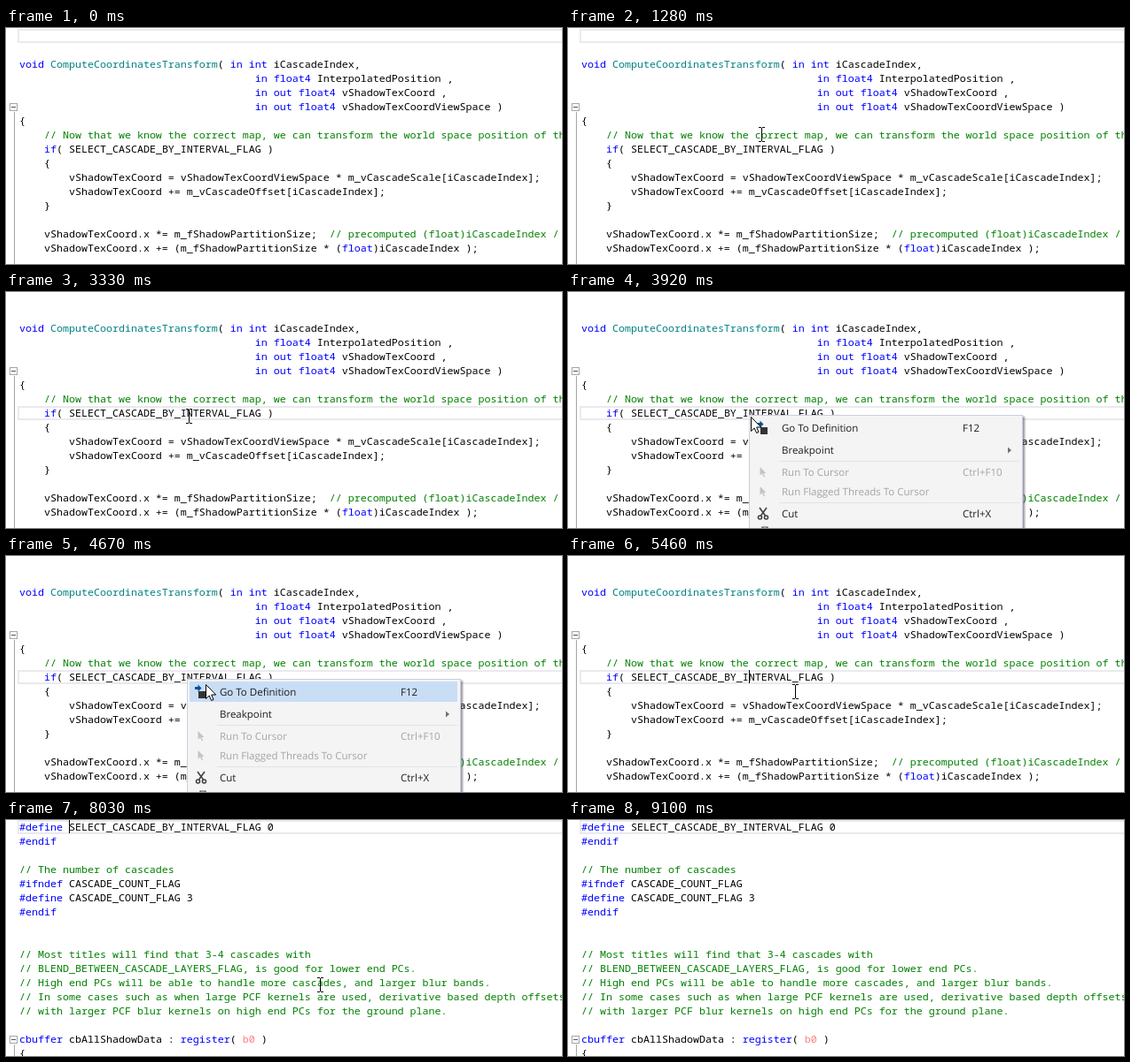
These frames come from a looping animation (627x267 px, 9.37 s). An HTML page:

```html
<!DOCTYPE html>
<html lang="en">
<head>
<meta charset="utf-8">
<title>Go to definition</title>
<style>
  html, body { margin: 0; width: 100%; height: 100%; overflow: hidden; background: #fff; }
  #stage { position: relative; width: 627px; height: 267px; overflow: hidden; contain: strict; }
  pre {
    position: absolute; left: 15px; margin: 0; color: #000;
    font: 11.667px/16px "Noto Sans Mono", "DejaVu Sans Mono", monospace;
  }
  .key { color: #00f; }
  .type { color: #008080; }
  .note { color: #008000; }
  .slot { color: #ff7f7f; }
  svg { position: absolute; left: 0; top: 0; overflow: hidden; }
  svg text { font: 11.5px "Open Sans", "Noto Sans", sans-serif; fill: #1e1e1e; text-rendering: geometricPrecision; }
  svg .off text { fill: #a2a4a5; }
  .off path { fill: #c3c4c8; }
  .shadow { filter: drop-shadow(2px 2px 1px rgba(40, 40, 60, .5)); }
</style>
</head>
<body>
<div id="stage">
<svg width="627" height="267">
  <rect id="line" x="14" width="630" height="14" fill="none" stroke="#eaeaee" stroke-width="2"/>
</svg>
<pre id="caller" style="top:1px"></pre>
<pre id="definition" style="top:0"></pre>
<svg width="627" height="267">
  <g id="fold" fill="none" stroke="#a5a5a5">
    <path d="M9.500 10V200"/>
    <rect x="4.500" y=".5" width="8" height="8" fill="#fff"/>
    <path d="M6 4.500h5" stroke="#555"/>
  </g>
  <rect id="caret" width="1" height="15"/>

  <g id="tip">
    <rect x="205.500" y="145.500" width="379" height="32" fill="#f3f3f4" stroke="#cccedb"/>
    <text x="218" y="166">(macro reference) #define SELECT_CASCADE_BY_INTERVAL_FLAG 0</text>
  </g>

  <g id="menu">
    <rect class="shadow" x="204.500" y="139.500" width="308" height="140" fill="#f4f4f5" stroke="#cccedb"/>
    <rect id="hover" x="207" y="142" width="302" height="23" fill="#c9def5"/>
    <path d="M238 191.500H509M238 238.500H509" stroke="#e2e3e7"/>
    <path d="M213 148h3.500v-2.500l4 4l-4 4v-2.500h-3.500z" fill="#00539c"/>
    <path d="M217 153h8v8h-8z" fill="#333"/>
    <text x="241" y="158">Go To Definition</text><text x="445" y="158">F12</text>
    <text x="241" y="183">Breakpoint</text>
    <path d="M496 175.500l4 3.500l-4 3.500z" fill="#717171"/>
    <g class="off">
      <path d="M216.500 198v9.500l2.500-2l2 4l1.200-1l-1.700-3.500h3z"/>
      <path d="M216.500 220v9.500l2.500-2l2 4l1.200-1l-1.700-3.500h3z"/>
      <text x="241" y="208">Run To Cursor</text><text x="445" y="208">Ctrl+F10</text>
      <text x="241" y="230">Run Flagged Threads To Cursor</text>
    </g>
    <g fill="none" stroke="#424242" stroke-width="1.600">
      <path d="M216 244l6.500 9M224 244l-6.500 9"/>
      <circle cx="216.500" cy="255" r="2"/><circle cx="223.500" cy="255" r="2"/>
      <path d="M219 270v-4h6v4" stroke-width="1.200"/>
    </g>
    <text x="241" y="255">Cut</text><text x="445" y="255">Ctrl+X</text>
  </g>

  <path id="beam" d="M-3 -8h3v1h1v-1h3v1h-3v15h3v1h-3v-1h-1v1h-3v-1h3v-15h-3z"/>
  <path id="arrow" d="M.5 .5V16.500L4.200 13L6.600 18.500L9 17.500L6.700 12H11.700Z" fill="#fff" stroke="#000"/>
</svg>
</div>
<script>
const $ = id => document.getElementById(id);

const indent = ' '.repeat(38);
const callerCode = `

void ComputeCoordinatesTransform( in int iCascadeIndex,
${indent}in float4 InterpolatedPosition ,
${indent}in out float4 vShadowTexCoord ,
${indent}in out float4 vShadowTexCoordViewSpace )
{
    // Now that we know the correct map, we can transform the world space position of the
    if( SELECT_CASCADE_BY_INTERVAL_FLAG )
    {
        vShadowTexCoord = vShadowTexCoordViewSpace * m_vCascadeScale[iCascadeIndex];
        vShadowTexCoord += m_vCascadeOffset[iCascadeIndex];
    }

    vShadowTexCoord.x *= m_fShadowPartitionSize;  // precomputed (float)iCascadeIndex /
    vShadowTexCoord.x += (m_fShadowPartitionSize * (float)iCascadeIndex );`;

const definitionCode = `#define SELECT_CASCADE_BY_INTERVAL_FLAG 0
#endif

// The number of cascades
#ifndef CASCADE_COUNT_FLAG
#define CASCADE_COUNT_FLAG 3
#endif


// Most titles will find that 3-4 cascades with
// BLEND_BETWEEN_CASCADE_LAYERS_FLAG, is good for lower end PCs.
// High end PCs will be able to handle more cascades, and larger blur bands.
// In some cases such as when large PCF kernels are used, derivative based depth offsets
// with larger PCF blur kernels on high end PCs for the ground plane.

cbuffer cbAllShadowData : register( b0 )
{`;

const rules = /(?<note>\/\/.*)|(?<key>#\w+|\b(?:void|in|out|int|float4?|if|cbuffer|register)\b)|(?<type>ComputeCoordinatesTransform)|(?<slot>\bb0\b)/g;

const highlight = code => code.replace(rules, (word, ...rest) => {
  const groups = rest[rest.length - 1];
  const kind = Object.keys(groups).find(name => groups[name]);
  return `<span class="${kind}">${word}</span>`;
});
$('caller').innerHTML = highlight(callerCode);
$('definition').innerHTML = highlight(definitionCode);

// Moments of the loop, in ms
const LOOP = 9370, CLICK = 2830, MENU = 3920, HOVER = 4580, CHOOSE = 5460, JUMP = 5560;

const progress = (t, from, to) => Math.min(1, Math.max(0, (t - from) / (to - from)));
const smooth = p => p * p * (3 - 2 * p);
const easeOut = p => Math.sin(p * Math.PI / 2);
const mix = (a, b, p) => Math.round(a + (b - a) * p);
const show = (id, on) => { $(id).style.display = on ? '' : 'none'; };
const place = (id, x, y) => $(id).setAttribute('transform', `translate(${x} ${y})`);

function pointer(t) {
  if (t < MENU) {
    const p = easeOut(progress(t, 880, 1480));
    return [mix(300, 206, p), mix(-8, 140, p)];
  }
  if (t < CHOOSE) {
    const p = easeOut(progress(t, 4555, 5000));
    return [mix(206, 253, p) + (t >= 5280), mix(141, 152, p)];
  }
  const p = smooth(progress(t, 7690, 8640));
  return [mix(256, 590, p) + (t >= 8690), mix(153, 264, p)];
}

function caretOn(t) {
  if (t < CLICK) return false;
  if (t < CHOOSE) return t < 3330;
  if (t < JUMP) return true;
  return t < 6020 || Math.floor((t - 6020) / 513) % 2 === 1;
}

function draw(t) {
  const jumped = t >= JUMP, inMenu = t >= MENU && t < CHOOSE;
  show('caller', !jumped);
  show('definition', jumped);
  place('fold', 0, jumped ? 244 : 85);

  const lineTop = jumped ? 0 : t < CLICK ? 1 : 129;
  $('line').setAttribute('y', lineTop + 1);
  place('caret', jumped ? 71 : 204, lineTop);
  show('caret', caretOn(t));

  show('tip', t < 2770);
  $('tip').style.opacity = progress(t, 1500, 1720);
  show('menu', inMenu);
  show('hover', t >= HOVER);

  show('beam', t >= 900 && t < 8720 && !inMenu);
  show('arrow', inMenu);
  place(inMenu ? 'arrow' : 'beam', ...pointer(t));
}

function tick() {
  draw(performance.now() % LOOP);
  requestAnimationFrame(tick);
}
tick();
</script>
</body>
</html>
```
